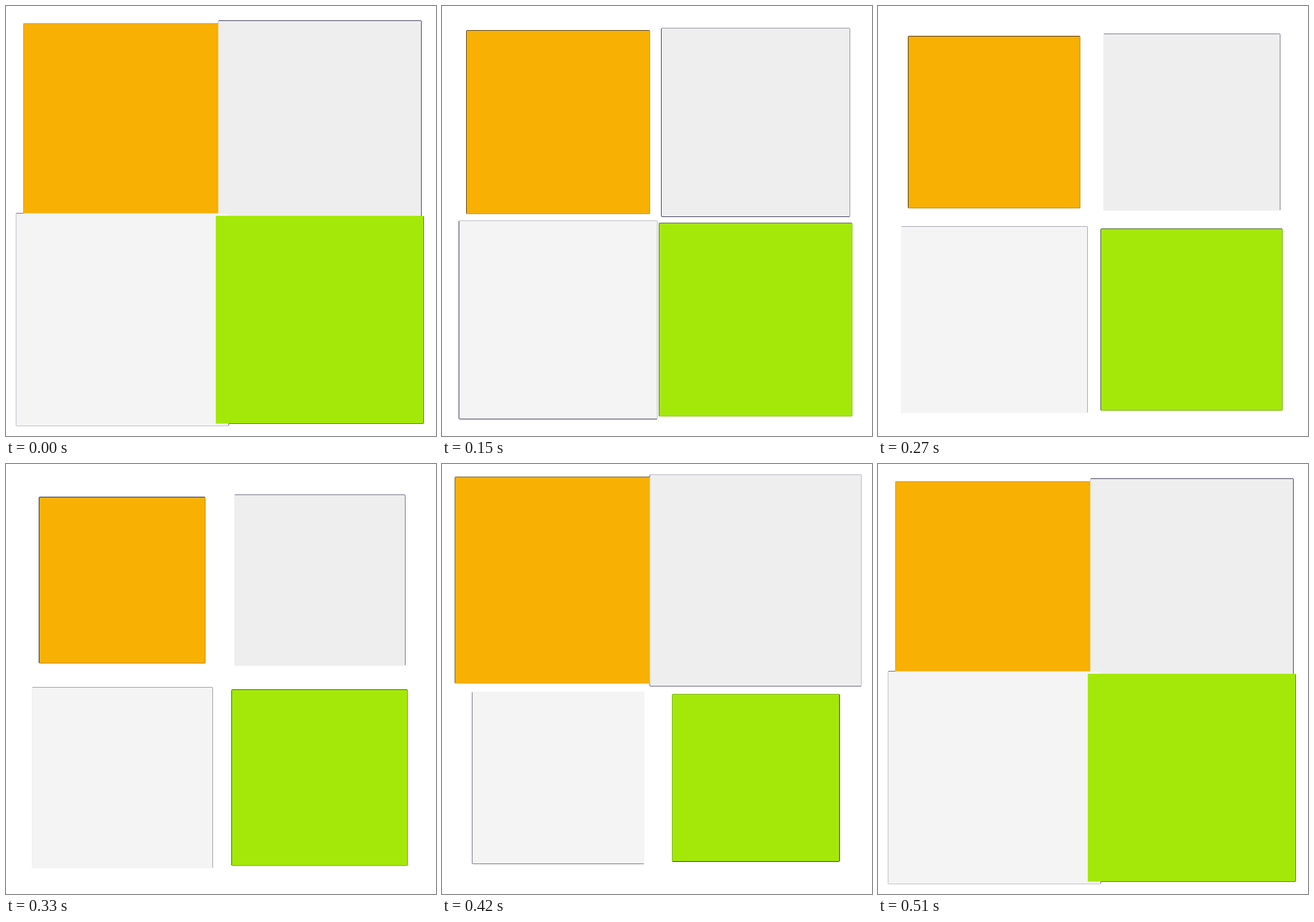
An HTML page with a canvas for the animation above (0.54 s loop, 748 by 748 pixels).

```html
<!DOCTYPE html>
<html lang="en">
<head>
<meta charset="utf-8">
<title>Pulsing blocks</title>
<style>
  html, body { margin: 0; width: 100%; height: 100%; overflow: hidden; background: #fff; }
  canvas { display: block; width: 748px; height: 748px; }
</style>
</head>
<body>
<canvas id="stage" width="748" height="748"></canvas>
<script>
const ctx = document.getElementById('stage').getContext('2d');
const STEP = 30, STEPS = 18, PERIOD = 17;
const NEAR = 202.3, FAR = 545.7;
const BIG = 185.05, SHRINK = 42.92;
const EDGE_MIN = 0.09;

const blocks = [
  { x: NEAR, y: NEAR, phase: 0.3, color: '#f8b002' },
  { x: FAR,  y: NEAR, phase: 0.2, color: '#eeeeee' },
  { x: NEAR, y: FAR,  phase: 0,   color: '#f4f4f4' },
  { x: FAR,  y: FAR,  phase: 0.1, color: '#a4e80a' }
];

// Snap outward to whole pixels, skipping slivers thinner than EDGE_MIN.
const low = v => Math.floor(v + EDGE_MIN);
const high = v => Math.ceil(v - EDGE_MIN);

function box(b, step) {
  const p = (step / PERIOD + b.phase) % 1;
  const half = BIG - SHRINK * p;
  return { l: b.x - half, r: b.x + half, t: b.y - half, b: b.y + half };
}

function fill(l, t, r, b) {
  ctx.fillRect(l, t, r - l, b - t);
}

function draw(step) {
  ctx.fillStyle = '#fff';
  ctx.fillRect(0, 0, 748, 748);
  const boxes = blocks.map(b => box(b, step));

  // Dark base: partly covered edge pixels blend with it into thin outlines.
  ctx.fillStyle = '#08062c';
  for (const q of boxes) {
    const l = low(q.l), r = high(q.r), t = low(q.t), b = high(q.b);
    fill(l, t + 1, r, b - 1);
    fill(l + 1, t, r - 1, b);
  }

  boxes.forEach((q, i) => {
    ctx.fillStyle = blocks[i].color;
    fill(q.l, q.t, q.r, q.b);
  });
}

const start = performance.now();
let shown = -1;

function tick() {
  const step = Math.floor((performance.now() - start) / STEP) % STEPS;
  if (step !== shown) draw(shown = step);
  requestAnimationFrame(tick);
}
tick();
</script>
</body>
</html>
```
